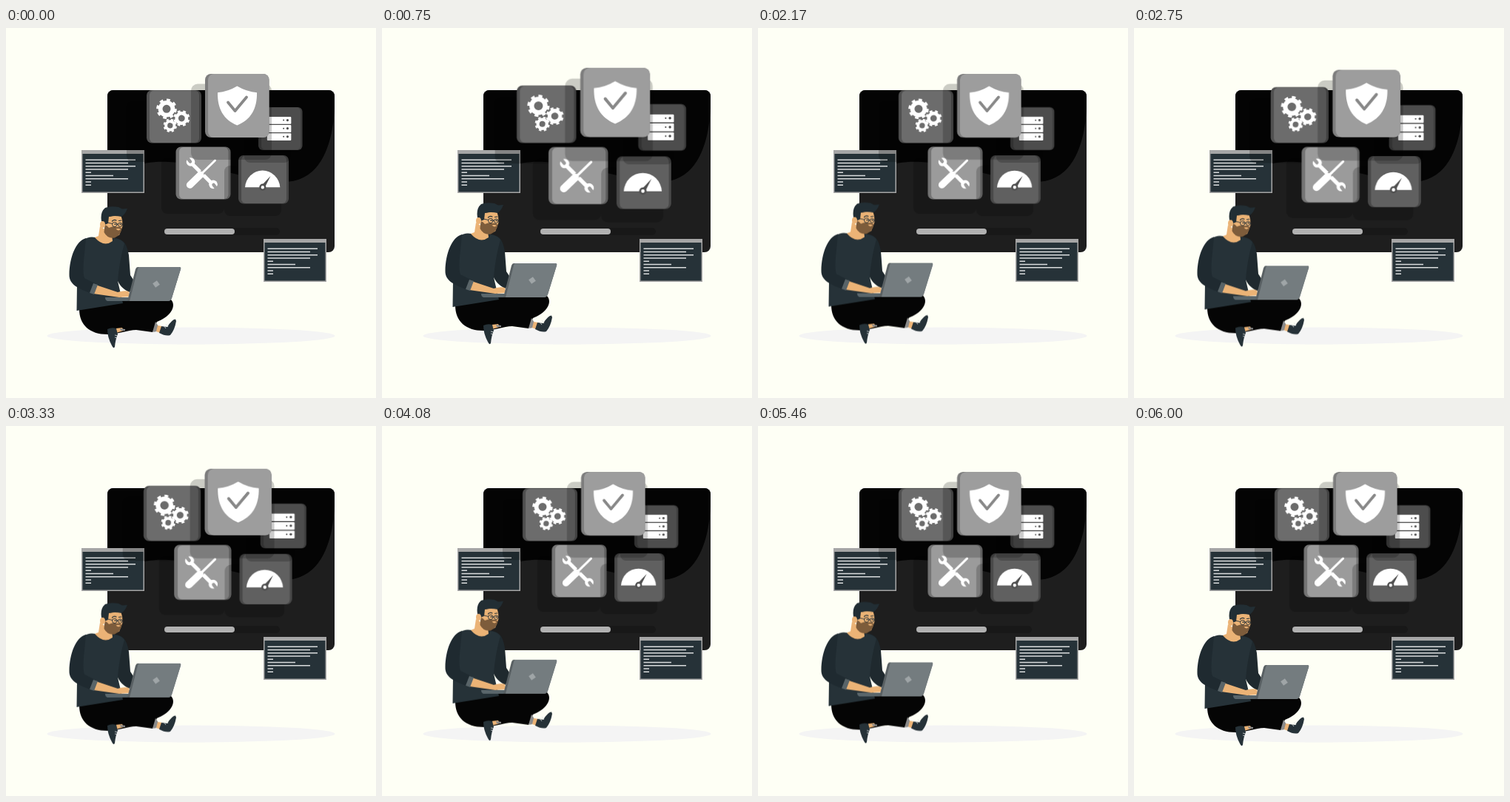
An HTML page for the animation above (6.04 s loop, 500 by 500 pixels).

```html
<!DOCTYPE html>
<html lang="en">
<head>
<meta charset="utf-8">
<title>Developer at work</title>
<style>
html, body { margin: 0; width: 100%; height: 100%; overflow: hidden; background: #fefff5; }
svg { display: block; width: 100%; height: 100%; }

/* 6 s of motion, then a 40 ms rest */
.man { animation: float 6040ms linear infinite; }
.cards { transform-origin: 281px 156px; animation: pulse 6040ms linear infinite; }
@keyframes float {
  0%, 49.669%, 99.338%, 100% { transform: translateY(0); }
  24.834%, 74.503% { transform: translateY(-10px); }
}
@keyframes pulse {
  0%, 29.801%, 39.735%, 59.603%, 100% { transform: scale(1); }
  9.934%, 49.669% { transform: scale(1.1); }
}

.shadow { fill: #000; opacity: .2; }
.white { fill: #fff; }
.line { fill: none; stroke-linecap: round; stroke-linejoin: round; }
.navy { fill: #263238; }
.skin { fill: #ebb376; }
</style>
</head>
<body>
<svg viewBox="0 0 500 500">
  <defs>
    <clipPath id="screen"><rect x="137" y="84" width="307" height="219" rx="8"/></clipPath>
    <g id="gear" fill="none" stroke="#fff">
      <circle r="8.4" stroke-width="5.8"/>
      <circle r="12" stroke-width="3.6" pathLength="16" stroke-dasharray="1 1"/>
    </g>
    <g id="code">
      <rect width="85" height="58" fill="#a6a6a6"/>
      <rect class="navy" x="1.5" y="5" width="82" height="51.5"/>
      <path d="M5.5 13.2h67.5M5.5 17.4h57.5M5.5 21.7h67.5M5.5 26h57.5M5.5 30.2h7.5M5.5 34.5h37.5M5.5 38.8h57.5M5.5 43h7.5M5.5 47.2h7.5" stroke="#d9dcdd" stroke-width="1.5"/>
    </g>
    <g id="row">
      <rect class="white" width="32.5" height="9.8" rx="1"/>
      <circle cx="22.3" cy="4.6" r="1" fill="#4d4d4d"/>
      <circle cx="27.6" cy="4.6" r="1.6" fill="#4d4d4d"/>
    </g>
  </defs>

  <ellipse cx="250" cy="416" rx="194.5" ry="11.5" fill="#f4f4f4"/>

  <g clip-path="url(#screen)">
    <path d="M137 84h307v219H137z" fill="#1e1e1e"/>
    <path d="M137 84H444V108C441 166 421 207 377 208C330 208 280 184 220 181C187 179 158 188 137 207z" fill="#040404"/>
  </g>
  <rect x="214" y="270" width="156" height="10" rx="5" fill="#181818"/>
  <rect x="214" y="271" width="95" height="8" rx="4" fill="#b1b1b1"/>
  <use href="#code" x="102" y="165"/>
  <use href="#code" x="348" y="285"/>

  <g class="cards">
    <!-- gears -->
    <rect class="shadow" x="163" y="99" width="88" height="82" rx="8"/>
    <rect x="190" y="84" width="74" height="71.5" rx="7" fill="#505050"/>
    <rect x="194" y="84.5" width="67" height="70.5" rx="6" fill="#6c6c6c"/>
    <use href="#gear" transform="translate(217 109.3)"/>
    <use href="#gear" transform="translate(237.3 122) scale(.8) rotate(12)"/>
    <use href="#gear" transform="translate(221.8 131.8) scale(.67) rotate(8)"/>

    <!-- tools -->
    <rect class="shadow" x="210" y="175" width="85" height="76" rx="8"/>
    <rect x="229.5" y="160.5" width="74" height="71" rx="7" fill="#747474"/>
    <rect x="234" y="161" width="66.5" height="70" rx="6" fill="#9b9b9b"/>
    <g class="line">
      <path d="M251 183L278 210" stroke="#fff" stroke-width="5"/>
      <circle cx="249.5" cy="181" r="5.8" class="white"/>
      <circle cx="280" cy="211.3" r="5.8" class="white"/>
      <path d="M249 180.5L245.3 175.8M280.5 211.8L284 216.5" stroke="#9b9b9b" stroke-width="4.4"/>
      <path d="M283 178.5L249 211.5" stroke="#9b9b9b" stroke-width="7" stroke-linecap="butt"/>
      <path d="M282.5 179L262 199" stroke="#fff" stroke-width="3"/>
      <path d="M262.7 198.3L248.5 212" stroke="#fff" stroke-width="9.4"/>
    </g>

    <!-- gauge -->
    <rect class="shadow" x="295" y="186" width="77" height="68" rx="8"/>
    <rect x="314" y="172" width="68" height="65.5" rx="7" fill="#484848"/>
    <rect x="318" y="172.5" width="61" height="64.5" rx="6" fill="#606060"/>
    <path class="white" d="M323 215.3A23.7 24.3 0 0 1 370.3 215.3z"/>
    <path d="M344.7 213.5L357.5 200L349.3 216.3z" fill="#505050"/>
    <circle cx="346.8" cy="215.2" r="3.4" class="white" stroke="#505050" stroke-width="2.4"/>

    <!-- server -->
    <rect class="shadow" x="322" y="121" width="62" height="61" rx="8"/>
    <rect x="341" y="107" width="59.5" height="58" rx="6" fill="#3e3e3e"/>
    <rect x="345" y="107.5" width="53" height="57" rx="5" fill="#4d4d4d"/>
    <use href="#row" x="352.8" y="120"/>
    <use href="#row" x="352.8" y="131.1"/>
    <use href="#row" x="352.8" y="142.2"/>

    <!-- shield -->
    <rect class="shadow" x="250" y="75.5" width="109" height="102.5" rx="9"/>
    <rect x="269" y="62" width="86.5" height="86" rx="8" fill="#7d7d7d"/>
    <rect x="273" y="62" width="82.5" height="86" rx="8" fill="#9d9d9d"/>
    <path class="white" d="M312.3 78.5Q325 86 339 87.3C339.5 109 331 124 312.3 131.5C294 124 285.500 109 286 87.300Q300 86 312.300 78.500z"/>
    <path class="line" d="M300 100.500L309.500 112L325 93.500" stroke="#888" stroke-width="3.800"/>
  </g>

  <g class="man">
    <!-- far arm and legs -->
    <path d="M147 284C160 285 164 294 166 307L168 334L174 343L167 357C158 353 153 347 150 340z" fill="#1f292e"/>
    <path d="M99 380C99 401 113 414 137 414C152 414 164 408 176 408L198 411L204 397C220 391 229 379 225 370Q223 365 215 365L153 368z" fill="#050505"/>
    <path d="M198 411L202 397L206 403L204 410z" fill="#8b8b8b"/>
    <path class="skin" d="M205 402L211 403L208 412L203 410z"/>
    <path class="navy" d="M207 412L210 403L218 404Q224 394 229 393.500L230 396Q228 408 222 415Q216 417 207 412z"/>
    <path d="M213 402l3 4M216 400l3 4" stroke="#dfe3e4" stroke-width=".8"/>
    <path class="skin" d="M148 406L157 405L159 409L149 412z"/>
    <path d="M154 406L161 407L161 409L155 409z" fill="#8b8b8b"/>
    <path class="navy" d="M137 407Q143 404 149 406L151 414Q148 420 147 431Q145 434 143 429Q137 418 137 407z"/>
    <path d="M147 415l4 1M147 418l3 1" stroke="#dfe3e4" stroke-width=".8"/>

    <!-- torso -->
    <path class="navy" d="M121 283Q133 294 145 284Q156 285 160 291Q153 316 151 342L158 372L95.500 382L96 346L105 286Q112 281 121 283z"/>
    <path class="skin" d="M127 268L125 281L120 283Q132 297 144 288L143 278z"/>

    <!-- head -->
    <path class="skin" d="M134 256L155 252Q158 260 157.500 268L153 280L141 282L134 277z"/>
    <path d="M133.500 266Q137 267 139 270Q146 267 149 269Q154 268 156.500 271Q155 280 147 283.500Q137 285 132.500 276z" fill="#7d5c3b"/>
    <path d="M148.500 271.500Q152 270.500 155 272Q152 275 148.500 271.500z" fill="#ebb376"/>
    <path d="M129 261Q127 249 134 243Q141 240 152 242L157 244.500L164 244Q161 252 156 255Q147 253 139 255L138 264L133 266z" fill="#222e34"/>
    <ellipse cx="130.500" cy="265.500" rx="3.500" ry="4.500" class="skin"/>
    <g class="line" stroke="#263238">
      <circle cx="146.800" cy="265.500" r="3.200" stroke-width=".9"/>
      <circle cx="154.300" cy="265.800" r="2.800" stroke-width=".9"/>
      <path d="M135 262.500L143.600 264.500M150 265h1.500" stroke-width=".9"/>
      <path d="M143.500 261Q146 258.500 149 260M152.500 260.500L156 260" stroke-width="1.200"/>
    </g>
    <circle cx="147.500" cy="265" r="1" class="navy"/>
    <circle cx="154.500" cy="265.300" r="1" class="navy"/>

    <!-- laptop and near arm -->
    <path d="M134 364H166V369H137Q134 368 134 364z" fill="#5a666b"/>
    <path class="skin" d="M121 347L151 357Q160 354 166 356L168 363L153 364L118 359z"/>
    <path d="M108 284C94 288 86 310 85.500 333C85 347 98 352 116 359L122 346L106 338Q103 330 106 305z" fill="#1f2a30"/>
    <path d="M118 345L124 347L119 360L113 358z" fill="#596468"/>
    <path d="M178 323H234Q237 323 236 326L224 365Q222.500 369 219 369H164L175 326Q176 323 178 323z" fill="#596063"/>
    <path d="M180 323H234Q237 323 236 326L224 365Q222.500 369 219 369H167L178 326Q178.500 323 180 323z" fill="#747c7f"/>
    <rect x="199.500" y="342.500" width="7" height="7" fill="#9fa5a7" transform="rotate(-35 203 346)"/>
  </g>
</svg>
</body>
</html>
```
